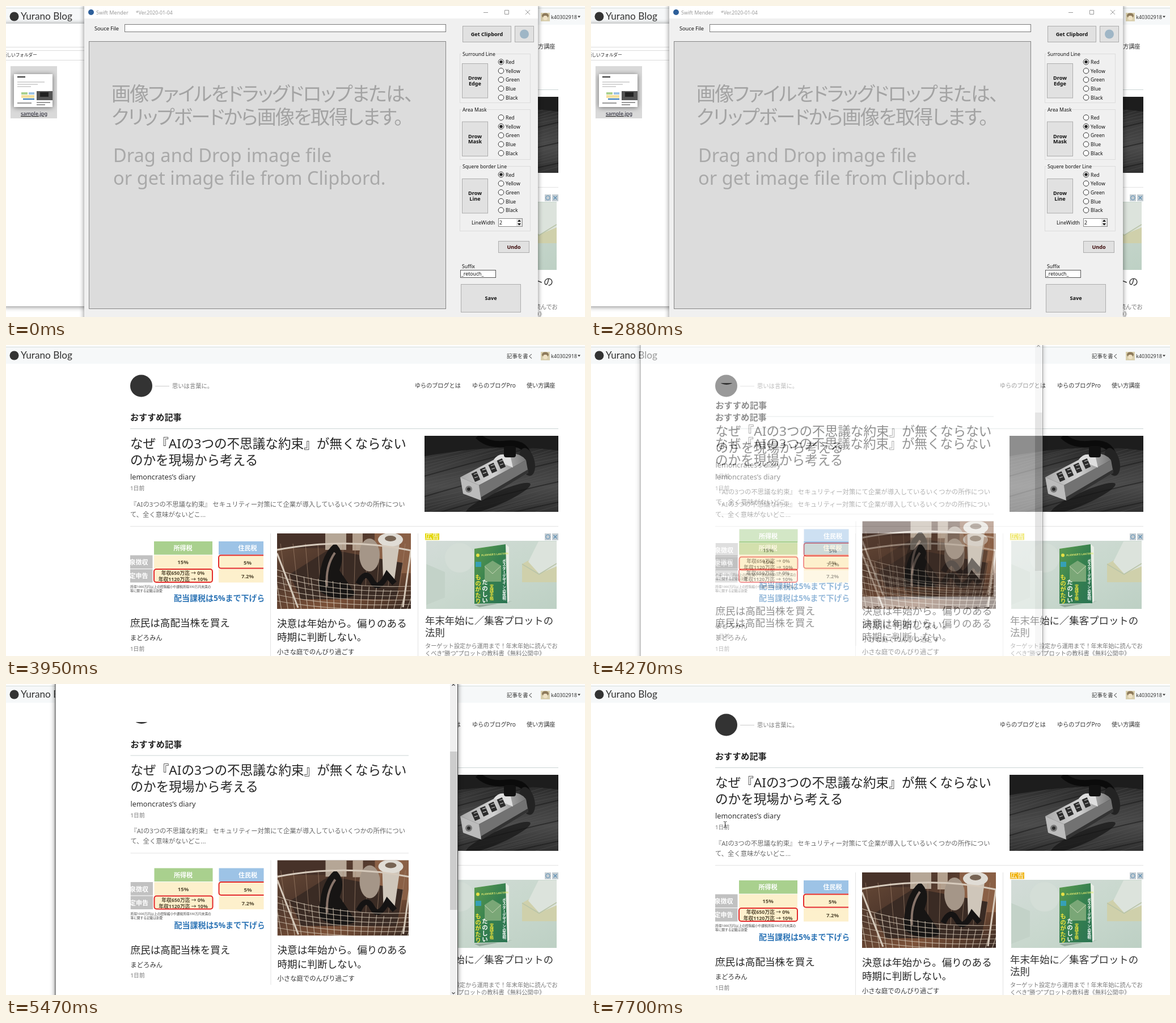
An HTML page for the animation above (8 s loop, 1021x548 px).

```html
<!DOCTYPE html>
<html lang="ja">
<head>
<meta charset="utf-8">
<title>Desktop capture</title>
<style>
html, body { margin: 0; width: 100%; height: 100%; overflow: hidden; background: #fff; }
#stage { display: block; width: 100vw; height: 100vh; }
text { font-family: "Noto Sans", "Noto Sans CJK JP", sans-serif; }
.b { font-weight: 700; }
.mid { text-anchor: middle; }
.logo { font-family: Lato, sans-serif; }
.tight { font-feature-settings: "palt"; letter-spacing: -1.7px; }
.down { writing-mode: vertical-rl; }
.thin { font-weight: 200; }
.shadow { filter: drop-shadow(0 1px 4px rgba(0,0,0,.5)); }
</style>
</head>
<body>
<svg id="stage" viewBox="0 0 1021 548"></svg>
<script>
const stage = document.getElementById('stage');

const text = (x, y, size, fill, str, cls = '') =>
  `<text x="${x}" y="${y}" font-size="${size}" fill="${fill}" class="${cls}">${str}</text>`;
const rect = (x, y, w, h, fill, more = '') =>
  `<rect x="${x}" y="${y}" width="${w}" height="${h}" fill="${fill}" ${more}/>`;
const box = (x, y, w, h, fill, stroke) => rect(x + .5, y + .5, w - 1, h - 1, fill, `stroke="${stroke}"`);
const dot = (x, y, r, fill, more = '') => `<circle cx="${x}" cy="${y}" r="${r}" fill="${fill}" ${more}/>`;
const oval = (x, y, rx, ry, fill, more = '') =>
  `<ellipse cx="${x}" cy="${y}" rx="${rx}" ry="${ry}" fill="${fill}" ${more}/>`;
const line = (d, stroke, w = 1, more = '') =>
  `<path d="${d}" fill="none" stroke="${stroke}" stroke-width="${w}" ${more}/>`;
const shape = (d, fill) => `<path d="${d}" fill="${fill}"/>`;
const view = (x, y, w, h, body) =>
  `<svg x="${x}" y="${y}" width="${w}" height="${h}" viewBox="${x} ${y} ${w} ${h}">${body}</svg>`;
const range = (n, f) => Array.from({ length: n }, (_, i) => f(i)).join('');

const gradient = (id, dir, ...stops) => `<linearGradient id="${id}" ${dir}>` +
  stops.map((c, i) => `<stop offset="${i / (stops.length - 1)}" stop-color="${c}"/>`).join('') + '</linearGradient>';

const defs = '<defs>' +
  gradient('wood', 'x2="0" y2="1"', '#1c1c1c', '#3a3a3a', '#4b4b4b', '#303030') +
  gradient('steel', 'x2="1" y2="0"', '#a9a9a9', '#d2d2d2', '#777') +
  gradient('warm', 'x2="1" y2="1"', '#6b4c38', '#51392d', '#7c5138', '#352721') +
  gradient('paper', 'x2="1" y2="1"', '#d3dcd8', '#c9d8ce', '#bdd0c4') +
  gradient('cover', 'x2="1" y2="1"', '#5c9c50', '#36804f', '#2b7453') + '</defs>';

function lockPhoto() {
  const grain = range(26, i => {
    const y = 195 + i * 6, bend = Math.sin(i * 7.3) * 9;
    return line(`M738 ${y} Q850 ${y - 30 + bend} 974 ${y - 62}`, i % 6 ? '#5a5a5a' : '#161616', i % 6 ? .8 : 2, 'opacity=".55"');
  });
  const dials = range(4, i => {
    const x = 828 + i * 15, y = 231 - i * 7.6;
    return rect(x - 5, y - 7, 10, 16, '#2c2c2c', `transform="rotate(-24 ${x} ${y})"`) +
      line(`M${x - 3} ${y - 3}l6 -2M${x - 2} ${y + 3}l6 -2`, '#c5c5c5', 1.2);
  });
  return view(738, 160, 236, 134, rect(738, 160, 236, 134, 'url(#wood)') + grain +
    shape('M738 160H974V186Q870 172 738 196Z', '#1d1d1d') +
    line('M832 160Q850 178 882 174T922 196', '#0b0b0b', 11) +
    oval(868, 270, 62, 11, '#151515', 'opacity=".7" transform="rotate(-24 868 270)"') +
    oval(919, 206, 13, 25, '#232323', 'transform="rotate(-14 919 206)"') +
    shape('M801 233L878 193Q905 187 917 203L834 247Z', 'url(#steel)') +
    shape('M834 247L917 203L921 225L838 274Z', '#727272') +
    shape('M801 233L834 247L838 274L806 262Z', '#bcbcbc') +
    shape('M838 268L921 219V225L838 275Z', '#333') +
    shape('M860 202Q872 186 890 198L894 216Z', '#dedede') + dials +
    rect(878, 178, 21, 20, '#111', 'rx="4"') + dot(816, 254, 6, '#777') + dot(816, 254, 3, '#2b2b2b'));
}

function basketPhoto() {
  const wires = range(20, i => line(`M${474 + i * 12.8} ${400 + i * 2}L${486 + i * 11.6} 468`, '#c8bba9', 1.3, 'opacity=".75"')) +
    range(6, i => line(`M478 ${396 + i * 11}Q580 ${430 + i * 8} 714 ${425 + i * 8}`, '#d3c6b5', 1.2, 'opacity=".75"'));
  const back = range(11, i => line(`M${484 + i * 22} 350L${494 + i * 20} 425`, '#a88b74', 1, 'opacity=".6"'));
  return view(478, 332, 236, 133, rect(478, 332, 236, 133, 'url(#warm)') +
    rect(478, 332, 85, 26, '#473229') + rect(563, 332, 37, 29, '#b5a696') + rect(611, 332, 18, 30, '#b3a08e') +
    rect(650, 332, 64, 70, '#8a6046') + shape('M500 404L570 360L700 384L688 448H520Z', '#3a2b24') + back +
    oval(641, 370, 18, 29, '#a59688') + shape('M663 350H694L685 413H665Z', '#cfc6ba') +
    oval(678, 343, 22, 12, '#e0dcd5') + oval(678, 341, 10, 5, '#776454') +
    shape('M552 433Q550 374 580 349Q600 365 588 397L617 440Q583 456 552 433Z', '#171514') +
    line('M566 425Q563 390 580 366', '#87746a', 4) +
    line('M621 421Q634 394 645 415T672 405L685 420', '#151313', 10) +
    line('M478 367L515 463M478 361Q600 338 714 362L700 462', '#d6cabc', 3) + wires);
}

function taxTable() {
  const cell = (x, y, w, fill) => rect(x, y, w, 23.5, fill);
  const ring = (x, y, w) => rect(x, y, w, 23, 'none', 'rx="4" stroke="#e32b2b" stroke-width="2"');
  const mid = (x, y, size, str, fill = '#554a32') => text(x, y, size, fill, str, 'b mid');
  return view(219, 332, 235, 133,
    cell(261, 346, 103, '#a9d08e') + cell(375, 346, 80, '#9dc3e6') +
    cell(219, 370.5, 39.5, '#c1c1c1') + cell(219, 395, 39.5, '#c1c1c1') +
    [261, 375].map(x => cell(x, 370.5, 103, '#fdf0cc') + cell(x, 395, 103, '#fdf0cc')).join('') +
    mid(312, 362, 11, '所得税', '#fff') + mid(426, 362, 11, '住民税', '#fff') +
    mid(234, 387, 11, '泉徴収', '#fff') + mid(234, 411, 11, '定申告', '#fff') +
    mid(312, 386, 9.5, '15%') + mid(426, 387, 9.5, '5%') + mid(426, 411, 9.5, '7.2%') +
    mid(312, 405, 8.8, '年収650万迄 → 0%') + mid(312, 416, 8.8, '年収1120万迄 → 10%') +
    ring(375, 370.5, 100) + ring(261, 395, 103) +
    text(219, 428, 5.7, '#444', '所得1000万円以上の控除縮小や課税所得330万円未満の') +
    text(219, 435, 5.7, '#444', '等に関する記載は割愛') +
    text(296, 451, 14, '#2e75b6', '配当課税は5%まで下げら', 'b'));
}

function advert() {
  return view(741, 345, 230, 120, rect(741, 345, 230, 120, 'url(#paper)') +
    shape('M741 386L774 400V445L741 458Z', '#c3d2c8') + dot(800, 375, 26, '#d4ded7') +
    shape('M910 386L937 371L971 383V418H910Z', '#cfd0ab') + shape('M921 382L939 346H971V390L940 403Z', '#dce3dc') +
    line('M910 386L940 404L971 385', '#b9c4a8', 1.5) +
    shape('M826 458L880 455L893 451L835 462Z', '#94a99b') +
    shape('M826 359L881 351L887 356V452L880 456L826 456Z', '#e9eee6') +
    shape('M826 359L881 351L884 455L826 456Z', 'url(#cover)') +
    '<g transform="rotate(-4 826 370)">' + dot(832, 371, 3, '#e5df45') +
    text(838, 373, 4.6, '#dce570', 'PLANNER’S LANTERN', 'b') + '</g>' +
    shape('M844 389L858 380L873 389V417H844Z', '#7aa777') + line('M844 390L858 403L873 389', '#c7d6b6') +
    rect(828, 382, 10, 9, '#36a0b6') +
    text(832, 404, 10.5, '#f0e43a', 'ものがたり', 'b down') +
    text(844, 413, 10.5, '#fff', 'たのしい', 'b down') + text(856, 422, 7, '#f0e43a', '実践手帳', 'b down') +
    text(878, 377, 6.6, '#fff', 'ポスターデザインの夜明', 'b down'));
}

function blogPage() {
  const ink = '#262626', soft = '#777';
  return dot(238.5, 72, 19.5, '#333') + line('M263 72.5H288', '#ccc') + text(293, 76, 10.3, soft, '思いは言葉に。') +
    text(721, 75, 10.1, '#333', 'ゆらのブログとは') + text(822, 75, 10.1, '#333', 'ゆらのブログPro') + text(918, 75, 10.1, '#333', '使い方講座') +
    text(219, 133, 15.1, '#222', 'おすすめ記事', 'b') + line('M219 147.5H974', '#ccd5d5') +
    text(219, 181.5, 22.6, ink, 'なぜ『AIの3つの不思議な約束』が無くならない') + text(219, 210.5, 22.6, ink, 'のかを現場から考える') +
    text(219, 237, 12.7, '#333', 'lemoncrates’s diary') + text(219, 256, 9.8, soft, '1日前') +
    text(219, 284.5, 11.35, '#666', '『AIの3つの不思議な約束』 セキュリティー対策にて企業が導入しているいくつかの所作につい') +
    text(219, 302.5, 11.35, '#666', 'て、全く意味がないどこ...') +
    line('M219 319.5H974M466.5 332V560M726.5 332V560', '#e3e3e3') + lockPhoto() + taxTable() + basketPhoto() +
    text(219, 496, 17.6, ink, '庶民は高配当株を買え') + text(219, 520, 11.3, '#333', 'まどろみん') + text(219, 538.5, 9.8, soft, '1日前') +
    text(478, 496.5, 17.6, ink, '決意は年始から。偏りのある') + text(478, 521, 17.6, ink, '時期に判断しない。') +
    text(478, 544.5, 11.35, '#333', '小さな庭でのんびり過ごす') +
    rect(739, 332, 25, 11.5, '#e3d600', 'class="badge"') + text(739.5, 341.8, 12, '#fff', '広告') +
    rect(950, 332, 11, 12, '#c3ccd2') + dot(955.5, 338, 3.7, 'none', 'stroke="#5b8fb5"') +
    rect(963, 332, 11, 12, '#c3ccd2') + line('M965.5 335l6 6m0 -6l-6 6', '#5b8fb5', 1.2) + advert() +
    text(739, 492, 17.4, '#333', '年末年始に／集客プロットの') + text(739, 512.5, 17.4, '#333', '法則') +
    text(739, 533.5, 10.2, soft, 'ターゲット設定から運用まで！年末年始に読んでお') +
    text(739, 547, 10.2, soft, 'くべき“勝つ”プロットの教科書《無料公開中》');
}

function blogHeader() {
  return rect(0, 3, 1021, 30, '#f6f8f9') + line('M0 3.5H1021', '#d3dbdb') +
    dot(14.5, 18.5, 8, '#333') + text(26, 24, 17.2, '#333', 'Yurano Blog', 'logo') +
    text(883, 22.5, 9.4, '#333', '記事を書く') + rect(943, 12, 16, 15, '#d9cfae') +
    oval(951, 17, 6, 4.5, '#8d7a5b') + oval(951, 21, 4, 4, '#efe2c5') +
    text(961, 22.5, 9, '#333', 'k40302918') + shape('M1008 17.5h5l-2.5 3z', '#333');
}

const windowButtons = (x, y, stroke, boxStroke = stroke) => line(`M${x} ${y + .5}h8`, stroke) +
  line(`M${x + 37.5} ${y - 3.5}h7v7h-7z`, boxStroke) + line(`M${x + 74} ${y - 4}l8 8m0 -8l-8 8`, stroke);

function explorer() {
  const rows = range(3, i => line(`M20 ${134 + i * 4}h${48 - i * 12}`, '#aaa', 1));
  return `<g class="shadow">${rect(-5, 31, 150, 498, '#fff')}</g>` +
    line('M0 72.5H140M0 78.5H140M0 95.5H140', '#dcdcdc') + text(-6, 89, 7.6, '#222', '新しいフォルダー') +
    rect(8, 106, 82, 92, '#d9d9d9') + `<g class="shadow">${rect(14, 120, 68, 58, '#fff')}</g>` +
    line('M20 125h14', '#333', 2) + rows + rect(54, 150, 28, 16, '#555') + rect(60, 152, 15, 8, '#222') +
    rect(27, 152, 11, 4, '#a9d08e') + rect(40, 152, 10, 4, '#9dc3e6') + rect(27, 157, 23, 5, '#f6df9d') +
    line('M30 164h20', '#2e75b6', 2) + line('M20 171h25M54 170h24M54 174h15', '#777', 1.4) +
    `<g text-decoration="underline">${text(26, 193, 9.1, '#112', 'sample.jpg')}</g>`;
}

function editor() {
  const label = (x, y, str, size = 8.7) => text(x, y, size, '#111', str);
  const button = (x, y, w, h, rows, fill = '#111') => box(x, y, w, h, '#e1e1e1', '#adadad') +
    rows.map((s, i) => text(x + w / 2, y + h / 2 + 3.2 + (i - (rows.length - 1) / 2) * 9.6, 9.1, fill, s, 'b mid')).join('');
  const radios = (y, checked) => ['Red', 'Yellow', 'Green', 'Blue', 'Black'].map((name, i) => {
    const cy = y + i * 15.7;
    return dot(873, cy, 4.8, '#fff', 'stroke="#333"') + (i === checked ? dot(873, cy, 2.8, '#222') : '') + label(881, cy + 3.5, name);
  }).join('');
  const group = (y, h, title, titleWidth, action, buttonY, radioY, checked) => box(800, y, 125, h, 'none', '#dcdcdc') +
    rect(803, y - 3, titleWidth, 8, '#f0f0f0') + label(805, y + 3.5, title) +
    button(804, buttonY, 46, 61.5, ['Drow', action]) + radios(radioY, checked);
  return `<g class="shadow">${rect(138, -8, 800, 564, '#f0f0f0')}</g>` + rect(138, 0, 800, 22, '#fff') +
    dot(150, 11, 5, '#2d5f9a') + text(159, 14.5, 9.1, '#999', 'Swift Mender') + text(229, 14.5, 8.7, '#999', '*Ver.2020-01-04') +
    windowButtons(842, 11, '#999') + label(156, 42.5, 'Souce File', 9.2) + box(209, 32, 567, 14, '#fff', '#7a7a7a') +
    box(146, 62, 630, 472, '#dcdcdc', '#858585') +
    text(186, 167, 34, '#a3a3a3', '画像ファイルをドラッグドロップまたは、', 'tight') +
    text(186, 208, 34, '#a3a3a3', 'クリップボードから画像を取得します。', 'tight') +
    text(189, 275, 32.6, '#a9a9a9', 'Drag and Drop image file') + text(189, 314.5, 32.6, '#a9a9a9', 'or get image file from Clipbord.') +
    button(805, 35, 86, 29, ['Get Clipbord']) + button(897, 35, 34, 29, []) + dot(914, 49.5, 8, '#9fb6c6') +
    group(84, 87, 'Surround Line', 60, 'Edge', 101, 98.5, 0) +
    group(182, 89, 'Area Mask', 45, 'Mask', 203.5, 196.5, 1) +
    group(282, 115, 'Squere border Line', 80, 'Line', 304, 297, 0) +
    label(821, 384.5, 'LineWidth') + box(868, 374, 43, 15, '#fff', '#8a8a8a') + label(870, 384.5, '2') +
    rect(900, 375, 10, 13, '#e4e4e4') + shape('M902 380l3 -3.5 3 3.5zM902 383l3 3.5 3 -3.5z', '#111') +
    button(868, 414, 55, 21, ['Undo'], '#3a0808') + label(804, 461.5, 'Suffix') +
    box(801, 465, 63, 14, '#fff', '#555') + label(803, 475, '_retouch_') + button(802, 490, 106, 50, ['Save']);
}

function browser() {
  return `<g class="shadow">${rect(87, -8, 709.5, 564, '#fff', 'stroke="#444"')}</g>` +
    view(139, 67, 571, 463, `<g transform="translate(.5 -21.5)">${blogPage()}</g>`) +
    rect(783, 0, 12.5, 548, '#f0f0f0') + rect(783, 119, 12.5, 279, '#cdcdcd') +
    line('M786.5 3l2.5 -2.5 2.5 2.5M786.5 543.5l2.5 2.5 2.5 -2.5', '#444', 1.2);
}

const tool = () => `<g class="shadow">${box(133, 271, 387, 177, '#fff', '#666')}</g>` + dot(146, 283, 5, '#b98f78') +
  text(155, 287, 9, '#111', 'Trimming Desk') + windowButtons(423, 283, '#222', '#ccc');
const inputMode = () => rect(552, 212, 102, 102, '#383838', 'opacity=".93"') + text(604, 298, 89, '#fff', 'A', 'thin mid');

const layers = {
  editor: explorer() + editor(),
  browser: browser(),
  inputMode: inputMode(),
  tool: tool(),
  arrow: '<path d="M0 0V12l3 -2.6 2 4.6 2 -.9 -2 -4.4h4z" fill="#fff" stroke="#111"/>',
  beam: line('M234 242.5h1.5l1 1 1 -1h1.5M236.5 243v9M234 252.5h1.5l1 -1 1 1h1.5', '#222')
};
stage.innerHTML = defs + rect(0, 0, 1021, 548, '#fff') + blogPage() + blogHeader() +
  Object.entries(layers).map(([id, body]) => `<g id="${id}">${body}</g>`).join('');

const part = Object.fromEntries(Object.keys(layers).map(id => [id, document.getElementById(id)]));
const badges = stage.querySelectorAll('.badge');
const show = (id, opacity) => {
  part[id].style.display = opacity ? '' : 'none';
  part[id].style.opacity = +opacity;
};

const passes = [[480, 1510, [442, 91], [992, 360]], [2020, 2360, [936, 458], [675, 534]]];

function draw(now) {
  const t = now % 8000, within = (a, b) => t >= a && t < b;
  show('editor', t < 3060);
  show('browser', within(4440, 7360) ? 1 : within(4270, 4440) || within(7360, 7530) ? .5 : 0);
  show('inputMode', within(3760, 3950) || within(4440, 4790));
  show('tool', within(7020, 7190));
  show('beam', t >= 7700);
  const pass = passes.find(([a, b]) => within(a, b));
  show('arrow', !!pass);
  if (pass) {
    const [a, b, from, to] = pass, k = Math.floor((t - a) / 171) * 171 / (b - a);
    part.arrow.setAttribute('transform', `translate(${from.map((v, i) => v + (to[i] - v) * k)})`);
  }
  badges.forEach(badge => badge.setAttribute('fill', t < 7360 ? '#e3d600' : '#efb310'));
  requestAnimationFrame(() => draw(performance.now()));
}
draw(performance.now());
</script>
</body>
</html>
```
